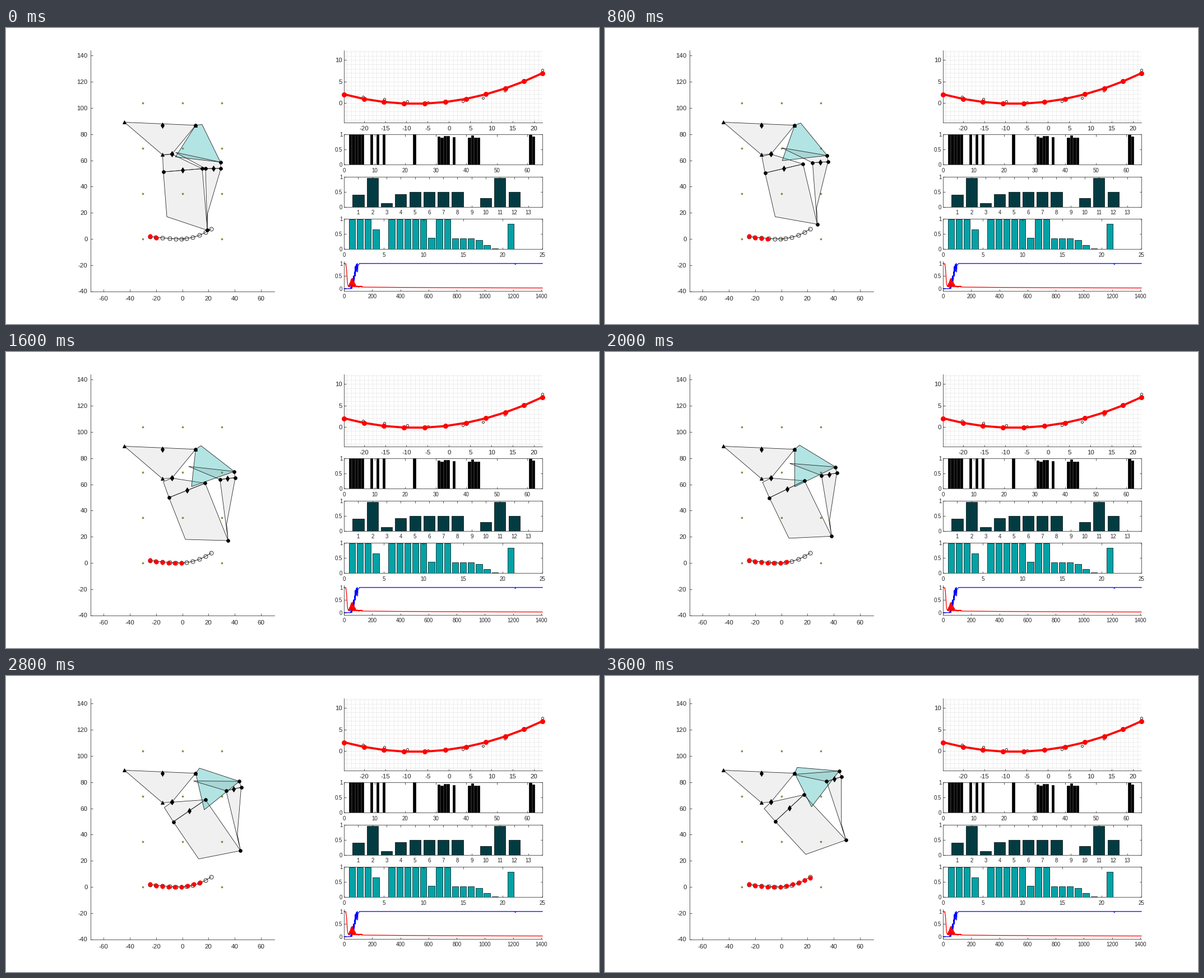
Recreate the animation shown at these times as a matplotlib script. Size 1058 by 529 pixels, loop 4 s.

```python
import numpy as np
import matplotlib.pyplot as plt
from matplotlib.animation import FuncAnimation

W, H = 1058, 529
PX = 0.72  # points per pixel at 100 dpi
INK = "#262626"
THIN = 0.75 * PX
FRAMES, STEP_MS = 10, 400

plt.rcParams.update({
    "font.family": "Liberation Sans",
    "axes.unicode_minus": False,
    "axes.linewidth": THIN,
    "axes.edgecolor": INK,
})
fig = plt.figure(figsize=(W / 100, H / 100), dpi=100, facecolor="white")
rng = np.random.default_rng(4)


def panel(left, top, right, bottom, xlim, ylim, xticks, yticks,
          size=9.8, pads=(5.6, 3), tick=3.5, box=True):
    """Axes placed by pixel edges, with inward ticks."""
    ax = fig.add_axes([left / W, 1 - bottom / H,
                       (right - left) / W, (bottom - top) / H])
    ax.set(xlim=xlim, ylim=ylim)
    ax.set_xticks(xticks, [f"{v:g}" for v in xticks])
    ax.set_yticks(yticks, [f"{v:g}" for v in yticks])
    ax.tick_params(direction="in", length=tick * PX, width=THIN,
                   color=INK, labelcolor=INK, labelsize=size * PX,
                   top=box, right=box)
    ax.tick_params(axis="x", pad=pads[0] * PX)
    ax.tick_params(axis="y", pad=pads[1] * PX)
    ax.spines[["top", "right"]].set_visible(box)
    return ax


def dots(ax, x, y, size, marker="o", face="black", edge="black", z=5):
    return ax.plot(x, y, marker, ms=size * PX, mfc=face, mec=edge,
                   mew=0.8 * PX, clip_on=False, zorder=z)[0]


# Path reached by the foot (a parabola) and the wanted path (a cubic)
s = np.linspace(0, 1, 11)
wave = [np.sin(n * np.pi * s) for n in range(5)]
path_x = -24.65 + 46.65 * s + 0.5 * wave[1] - 0.3 * wave[2]
path_y = 0.008 * (path_x + 8) ** 2 - 0.25
goal_x = path_x + 0.45 * wave[2] - 0.5 * wave[4]
goal_y = 0.0078 * (goal_x + 3) ** 2 + 0.00018 * (goal_x + 3) ** 3

# Right column
LEFT, RIGHT = 603.2, 957.2
ax = panel(LEFT, 40, RIGHT, 168.5, (-24.67, 22), (-4.6, 12.3),
           range(-20, 21, 5), (0, 5, 10), 11.5, (6.6, 3), box=False)
grid = dict(color="#e9e9e9", lw=0.8 * PX, zorder=0)
for v in range(-24, 23):
    ax.axvline(v, **grid)
for v in range(-4, 13):
    ax.axhline(v, **grid)
dots(ax, goal_x[1:], goal_y[1:], 4, face="none", z=3)
ax.plot(path_x, path_y, "-o", color="red", lw=3.8 * PX, ms=9 * PX,
        mew=0, clip_on=False, zorder=4)


def bars(top, xmax, xticks, x, y, color):
    ax = panel(LEFT, top, RIGHT, top + 54, (0, xmax), (0, 1), xticks, (0, 0.5, 1))
    ax.bar(x, y, 0.8, color=color, edgecolor="black", linewidth=0.7 * PX)


genes = np.array([*range(2, 7), 9, 11, 13, 23, *range(31, 35), 36,
                  *range(41, 45), 61, 62])
bars(190, 65, range(0, 61, 10), genes,
     1 - (genes > 30) * rng.uniform(0, 0.12, genes.size), "black")

parts = np.full(12, 0.5)
parts[[1, 10]] = 0.95
parts[[0, 3, 9]] = 0.4, 0.42, 0.29
parts[[2, 8]] = 0.13, 0
bars(265.7, 14, range(1, 14), np.arange(1, 13), parts, "#023c42")

# A full plateau, then a step that fades out, with a few outliers
n = np.arange(1, 22)
sizes = np.where(n < 14, 0.99, 0.36 / (1 + np.exp(2 * (n - 17.7))))
sizes[[3, 4, 10, 20]] = 0.64, 0, 0.37, 0.84
bars(341, 25, range(0, 26, 5), n, sizes, "#03a2a6")

ax = panel(LEFT, 416.8, RIGHT, 470.3, (0, 1409), (-0.1, 1.09),
           range(0, 1401, 200), (0, 0.5, 1), pads=(5, 3), box=False)
t = np.arange(1409)
noise = rng.uniform(-1, 1, t.size)
blue = np.clip((t - 45) / 50, 0, 0.9) + 0.25 * noise * ((t > 48) & (t < 98))
blue += 0.1 * np.clip((t - 95) / 15, 0, 1)
blue = np.clip(blue, 0, 1) - 0.03 * (abs(t - 1216) < 3)
red = 0.93 / (1 + np.exp((t - 20) / 2.5)) + 0.02 + 0.05 * np.exp(-t / 700)
red += 0.4 * abs(noise) * np.exp(-((t - 57) / 18) ** 2)
red += 0.04 * abs(noise) * ((t > 70) & (t < 130))
for y, color in ((blue, "blue"), (red, "red")):
    ax.plot(t, y, color=color, lw=1.3 * PX, clip_on=False)

# Linkage
stage = panel(150.5, 40, 478.5, 470.5, (-70, 70), (-40, 144),
              range(-60, 61, 20), range(-40, 141, 20), 11.5, (8.8, 5), 4.3, False)
gx, gy = np.meshgrid([-30, 0, 30], np.linspace(0, 104, 4))
dots(stage, gx.ravel(), gy.ravel(), 2.6, face="#d8d840", edge="#55551a", z=1)
stage.plot(goal_x, goal_y, "-", color="black", lw=0.8 * PX, zorder=4)
dots(stage, goal_x, goal_y, 7, face="none", z=4)

P, Q = -7.9 + 64.75j, 10.2 + 86.8j
TIP, HEEL = -44 + 89.1j, -15.1 + 64.3j
CRANK, COUPLER, ROCKER = 64.1, 53.0, 33.87


def polar(r, deg):
    return r * np.exp(1j * np.radians(deg))


def xy(points):
    points = np.array(points)
    return np.column_stack([points.real, points.imag])


def pose(k):
    """Four-bar solution: polygons, joints and link centres at step k."""
    turn = polar(1, -65.1 + 4.25 * k)
    foot = P + CRANK * turn
    gap = Q - foot
    d = abs(gap)
    a = (COUPLER**2 - ROCKER**2 + d**2) / (2 * d)
    elbow = foot + gap / d * (a - 1j * np.sqrt(COUPLER**2 - a**2))

    knee, hip, back, toe = (P + turn * polar(r, g) for r, g in
                            [(25.63, 39.4), (15.04, -50.5), (7.1, -109.3), (47.93, -29.5)])
    u = (elbow - foot) / COUPLER
    heel, ankle, wing, shin = (foot + u * polar(r, g) for r, g in
                               [(48.4, -1.5), (47.1, 12.55), (64.2, 33), (12.6, 10.2)])
    v = (elbow - Q) / ROCKER
    crest, low = Q + v * polar(4.87, 63.9), Q + v * polar(28.66, -66.3)

    polys = [[TIP, Q, P, HEEL], [back, P, knee, hip], [hip, knee, foot, toe],
             [Q, crest, elbow, low], [wing, elbow, heel, ankle],
             [ankle, heel, shin, foot]]
    joints = [P, Q, knee, hip, foot, elbow, ankle, heel]
    centres = [-15 + 86.8j, P, (knee + hip) / 2, (ankle + heel) / 2]
    return polys, joints, centres


GREY, TEAL = (0, 0, 0, 0.06), (0, 0.66, 0.64, 0.3)
links = [stage.add_patch(plt.Polygon(xy([0, 1, 1j]), fc=fill, ec="#1a1a1a",
                                     lw=0.8 * PX, zorder=2))
         for fill in (GREY, GREY, GREY, TEAL, GREY, GREY)]
dots(stage, *xy([TIP, HEEL, Q]).T, 6, "^")
joint_dots = dots(stage, [], [], 5.8)
centre_dots = dots(stage, [], [], 4.4)
centre_tips = dots(stage, [], [], 6.8, "d")
trail = dots(stage, [], [], 7.3, face="red", edge="red", z=6)


def update(k):
    polys, joints, centres = pose(k)
    for link, poly in zip(links, polys):
        link.set_xy(xy(poly))
    joint_dots.set_data(*xy(joints).T)
    for mark in (centre_dots, centre_tips):
        mark.set_data(*xy(centres).T)
    trail.set_data(path_x[:k + 2], path_y[:k + 2])
    return [*links, joint_dots, centre_dots, centre_tips, trail]


anim = FuncAnimation(fig, update, frames=FRAMES, interval=STEP_MS,
                     init_func=lambda: update(0), repeat=True, repeat_delay=0)
plt.show()
```
